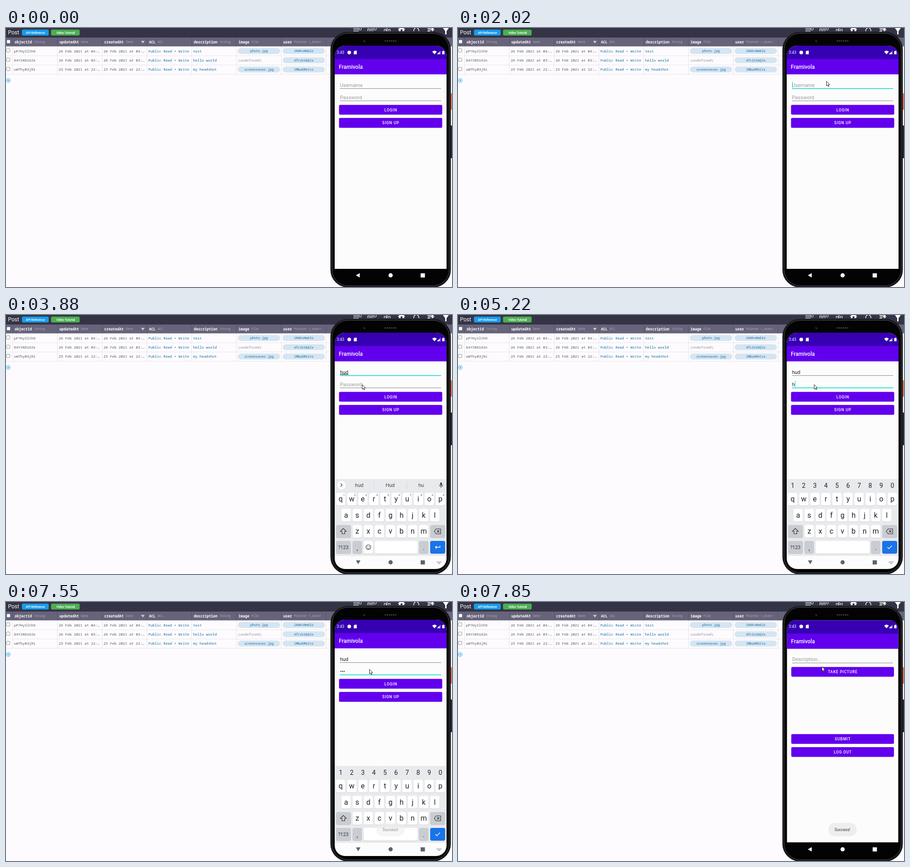
An HTML page for the animation above (8000 ms loop, 981 by 571 pixels).

```html
<!DOCTYPE html>
<html lang="en">
<head>
<meta charset="utf-8">
<title>Post table and phone app</title>
<style>
  html, body { margin: 0; width: 100%; height: 100%; overflow: hidden; background: #fdfbfd; }
  svg { display: block; width: 981px; height: 571px; font-family: Roboto, sans-serif; }
  text { white-space: pre; }
  .mono { font-family: "Noto Sans Mono", "DejaVu Sans Mono", monospace; }
</style>
</head>
<body>
<svg viewBox="0 0 981 571">
  <defs>
    <clipPath id="glass"><rect x="723" y="39" width="246" height="521" rx="23"/></clipPath>
  </defs>
  <g id="page"></g>
  <g id="phone"></g>
  <g id="screen" clip-path="url(#glass)"></g>
  <path id="pointer" d="M.5 .5V10.5L2.8 8.4L4.4 12L6 11.3L4.4 7.8H7.6Z" fill="#fff" stroke="#111" stroke-width=".9"/>
</svg>
<script>
const LOOP = 8000;
const PURPLE = '#6200ee', TEAL = '#03dac5', INK = '#202124', BLUE = '#0e69a1';
const APP_NAME = 'Framivola', USER = 'hud';
const $ = id => document.getElementById(id);

const rect = (x, y, w, h, fill, r = 0, extra = '') =>
  `<rect x="${x}" y="${y}" width="${w}" height="${h}" rx="${r}" fill="${fill}" ${extra}/>`;
const circle = (x, y, r, fill, extra = '') => `<circle cx="${x}" cy="${y}" r="${r}" fill="${fill}" ${extra}/>`;
const shape = (d, fill, extra = '') => `<path d="${d}" fill="${fill}" ${extra}/>`;
const line = (d, color, width = 1) => `<path d="${d}" fill="none" stroke="${color}" stroke-width="${width}"/>`;
const label = (s, x, y, size, fill, extra = '') =>
  `<text x="${x}" y="${y}" font-size="${size}" fill="${fill}" ${extra}>${s.replace(/</g, '&lt;')}</text>`;
const centered = (s, x, y, size, fill, extra = '') => label(s, x, y, size, fill, `text-anchor="middle" ${extra}`);
const mono = (s, x, y, size, fill, extra = '') => label(s, x, y, size, fill, `class="mono" ${extra}`);

// ---------- database table ----------
function toolbarIcons() {
  return line('M764 1H776M764 4H776M764 7H776M796 7V2H800V7M803 7V2H807V7M832 7V3H836V7M838 7V0M841 7V3H845V7', '#fff', 1.2)
    + circle(779, 2, 2.6, 'none', 'stroke="#fff"') + circle(812, 2, 2.6, 'none', 'stroke="#fff"')
    + shape('M862 3L870 -3L878 3L876 4V7H872V3H868V7H864V4Z', '#fff')
    + line('M897 7A6 6 0 0 1 901 0M904 0A6 6 0 0 1 908 7', '#fff', 1.5)
    + line('M927 1H936M928 4H934M927 7H933', '#fff', 1.3)
    + shape('M938 -1L934 5H938L936 9L943 3H939L942 -1Z', '#fff')
    + shape('M961 0H974L969 7V14H966V7Z', '#fff');
}

function buildPage() {
  const columns = [['objectId', 'String', 62], ['updatedAt', 'Date', 165], ['createdAt', 'Date', 264],
    ['ACL', 'ACL', 334], ['description', 'String', 470], ['image', 'File', 540], ['user', 'Pointer <_User>', 634]];
  const rows = [
    ['pP7HySlth9', '26 Feb 2021 at 04:…', 'test', 'photo.jpg', 'iN4KvNm62z'],
    ['84YSRDi6Ze', '26 Feb 2021 at 03:…', 'hello world', '', '4fc3rSAQIx'],
    ['uWThy03jRi', '25 Feb 2021 at 22:…', 'my headshot', 'screensaver.jpg', '1MbuKMrCvs']];
  const edges = [14.5, 113, 211.5, 310, 408.5, 507, 605.5, 704];
  const pill = (s, x, y) => rect(x, y - 6.5, 93, 13, '#d5e5f2', 6.5)
    + centered(s, x + 46.5, y + 2.6, 7.2, BLUE, 'class="mono"');

  let out = rect(0, 0, 981, 571, '#fdfbfd') + rect(0, 0, 981, 21, '#353446') + rect(0, 21, 981, 19.5, '#66637a')
    + label('Post', 4.5, 14, 12, '#fff')
    + rect(35, 3.5, 59, 13, '#169cee', 3) + rect(99, 3.5, 63, 13, '#4caf50', 3)
    + centered('API Reference', 64.5, 12.7, 7, '#fff', 'font-weight="500" letter-spacing="-.2"')
    + centered('Video Tutorial', 131, 12.7, 7, '#fff', 'font-weight="500" letter-spacing="-.2"')
    + toolbarIcons() + rect(2, 26.5, 7, 7, '#fff', 1) + shape('M297 28.5H305L301 34Z', '#cfcdd8');
  columns.forEach(([name, type, typeX], i) => {
    out += mono(name, edges[i] + 4.5, 33.5, 7.9, '#fff', 'font-weight="600"') + mono(type, typeX, 33.2, 6.6, '#b3b0c2');
  });
  edges.forEach(x => {
    out += rect(x - .5, 21, 1, 19.5, '#55526a') + rect(x - .5, 40.5, 1, 61, '#e5e4ea');
  });
  rows.forEach(([id, date, description, file, user], i) => {
    const y = 50.7 + i * 20.4, base = y + 2.9;
    out += rect(0, y + 10, 714, 1, '#e5e4ea') + rect(1, y - 5, 7.5, 7.5, '#fff', 1.5, 'stroke="#777" stroke-width=".8"')
      + mono(id, 17.5, base, 7.9, '#555566') + mono(date, 116, base, 7.9, '#555566') + mono(date, 214.5, base, 7.9, '#555566')
      + mono('Public Read + Write', 313, base, 7.9, BLUE) + mono(description, 411.5, base, 7.9, BLUE)
      + (file ? pill(file, 510, y) : mono('(undefined)', 510.5, base, 7.9, '#8a8a98'))
      + pill(user, 608.5, y);
  });
  return out + circle(5, 115.7, 4.2, 'none', 'stroke="#169cee"') + line('M2.7 115.7H7.3M5 113.4V118', '#169cee');
}

function buildPhone() {
  return rect(977, 144, 4, 36, '#e8795a') + rect(977, 215, 4, 72, '#26262a')
    + rect(714.5, 9.5, 263, 561.5, '#050506', 38, 'stroke="#1b1b1d" stroke-width="2"')
    + rect(717, 11.5, 258, 557, '#050506', 36, 'stroke="#58585c" stroke-width="1"')
    + rect(720, 14, 252, 552, '#030303', 33)
    + circle(788, 29, 2.2, '#242428') + line('M785 26L791 32', '#333', .8)
    + `<path d="M833 28.5H860" stroke="#3a3a3c" stroke-width="3" stroke-dasharray="3 1.5"/>`;
}

// ---------- phone screens ----------
function appBars() {
  return rect(723, 39, 246, 492, '#fdfcfd') + rect(723, 39, 246, 30, '#3700b3') + rect(723, 68.5, 246, 33.7, PURPLE)
    + label(APP_NAME, 732, 90.2, 12, '#fff', 'font-weight="500"');
}

function statusIcons() {
  return label('3:43', 727.5, 57.2, 8.6, '#fff') + circle(755, 54, 4, '#fff')
    + shape('M767 50H771.5V58H765V52Z', '#fff')
    + shape('M937.5 52.2Q942.5 48 947.5 52.2L942.5 58Z', '#fff')
    + shape('M948 58L956 50V58Z', '#fff', 'fill-opacity=".5"') + shape('M948 58L953.5 52.5V58Z', '#fff')
    + shape('M959.5 51H961V50H963V51H964.5V58H959.5Z', '#fff');
}

const button = (s, y, ripple = 0) => rect(732.5, y, 227, 21.6, PURPLE, 2.5)
  + (ripple ? rect(732.5, y, 227, 21.6, '#fff', 2.5, `opacity="${ripple}"`) : '')
  + centered(s, 846.4, y + 14, 8.5, '#fff', 'font-weight="500" letter-spacing=".76"');

function field(hint, value, base, { focused, caretX, underline }) {
  return label(value || hint, 734.7, base, 11, value ? '#222' : '#9b9a9b', underline ? 'text-decoration="underline"' : '')
    + (focused ? rect(734.5, base + 3.2, 222.5, 1.6, TEAL) : rect(734.5, base + 3.5, 222.5, 1, '#858485'))
    + (caretX ? rect(caretX, base - 11, 1.1, 13, TEAL) : '');
}

function loginScreen(t) {
  const name = USER.slice(0, [2880, 3030, 3180].filter(s => t >= s).length);
  const typed = [5220, 5370, 5970].filter(s => t >= s).length;
  const hidden = t >= 7400 ? typed : Math.max(0, typed - 1);
  const password = '•'.repeat(hidden) + USER.slice(hidden, typed);
  const onPassword = t >= 4010, onName = t >= 1860 && !onPassword;
  const nameCaret = onName && (t < 2590 || (t >= 2880 && t < 3640));
  const passwordCaret = onPassword && (t < 4760 || (t >= 5220 && t < 7400));
  const ripple = t >= 6510 && t < 6960 ? [.24, .17, .08][Math.floor((t - 6510) / 150)] : 0;
  return appBars()
    + field('Username', name, 129.5, { focused: onName, caretX: nameCaret && 735 + name.length * 6.1, underline: onName && name })
    + field('Password', password, 156.6, {
        focused: onPassword, caretX: passwordCaret && 735 + hidden * 3.5 + (typed - hidden) * 6.1 })
    + button('LOGIN', 169.5, ripple) + button('SIGN UP', 198.3);
}

const postScreen = () => appBars() + field('Description...', '', 129.5, {})
  + button('TAKE PICTURE', 142.4) + button('SUBMIT', 291.2) + button('LOG OUT', 320);

const toast = opacity => `<g opacity="${opacity}">` + rect(814.5, 487, 62.5, 29.5, '#eeeeee', 14.7)
  + centered('Success!', 845.6, 505.2, 8.6, '#333') + '</g>';

// ---------- keyboard ----------
const KEY_STEP = 24.37, GREY = '#c9ccd1';
const key = (x, y, w, fill = '#fff') => rect(x, y + .8, w, 28, '#c3c5c9', 4) + rect(x, y, w, 28, fill, 4);

function toolStrip() {
  return line('M739.5 371.5L736 375L739.5 378.5', '#444', 1.3)
    + circle(769.5, 374, 3.2, 'none', 'stroke="#555" stroke-width="1.3"') + line('M772 376.5L775.5 380', '#555', 1.4)
    + rect(801.5, 370.5, 9, 9, 'none', 2, 'stroke="#555" stroke-width="1.2"') + line('M803.5 375.5Q806 378.5 808.5 375.5M804 373H805M807.5 373H808.5', '#555')
    + centered('GIF', 841, 378, 8, '#444', 'font-weight="700"')
    + rect(873.5, 371, 8.5, 9.5, 'none', 1, 'stroke="#555" stroke-width="1.2"') + rect(876, 369.5, 3.5, 2.5, '#555')
    + line('M875.5 374.5H880M875.5 377H880', '#555', .9) + rect(899, 368, 1, 14, '#cfd1d5')
    + [917.5, 921.5, 925.5].map(x => circle(x, 375.3, 1.1, '#555')).join('');
}

function suggestionStrip(word) {
  const words = [word, word[0].toUpperCase() + word.slice(1), USER.slice(0, 2)];
  return line('M736 371.5L739.5 375L736 378.5', '#444', 1.3)
    + words.map((w, i) => centered(w, [777, 845, 913][i], 379.2, 11, '#444')).join('')
    + rect(809, 368, 1, 15, '#cfd1d5') + rect(881, 368, 1, 15, '#cfd1d5');
}

function keyboard(t) {
  const numeric = t >= 4150;
  const word = USER.slice(0, t < 3030 ? 1 : t < 3180 ? 2 : 3);
  let out = rect(723, 361.5, 246, 170, '#e8eaed');
  if (!numeric) {
    out += circle(738, 375, 9.2, '#fff') + (t < 2880 ? toolStrip() : suggestionStrip(word))
      + rect(955, 369, 4, 7.5, '#444', 2) + line('M953 374A4 4 0 0 0 961 374M957 378V381', '#444', 1.1);
  }
  [['qwertyuiop', 736.1, 392], ['asdfghjkl', 748.2, 427.5], ['zxcvbnm', 772.6, 463]].forEach(([letters, x0, y]) => {
    [...letters].forEach((c, i) => {
      const x = x0 + i * KEY_STEP;
      out += key(x - 10.3, y, 20.6) + centered(c, x, y + 19, 16, INK);
    });
  });
  [...'1234567890'].forEach((digit, i) => {
    const x = 736.1 + i * KEY_STEP;
    out += numeric ? centered(digit, x, 381, 14, INK) : centered(digit, x + 7, 399, 6, '#444');
  });
  out += key(726, 463, 32.5, GREY) + line('M742 470.5L735.5 477H739V482.5H745V477H748.5Z', '#333', 1.2)
    + key(933, 463, 33, GREY) + line('M942 477L946 471.5H956V482.5H946ZM948 474.5L953 479.5M953 474.5L948 479.5', '#333', 1.2)
    + key(726, 498, 32.5, GREY) + centered('?123', 742, 516, 10.5, '#333')
    + key(762.3, 498, 20.6, GREY) + centered(',', 772.6, 519, 14, INK)
    + key(908.5, 498, 20.6, GREY) + centered('.', 918.8, 518, 14, INK)
    + key(numeric ? 786.5 : 811, 498, numeric ? 118.5 : 94) + key(933, 498, 33, '#1a73e8');
  if (!numeric) {
    out += key(786.7, 498, 20.6) + circle(797, 511.8, 5.3, 'none', 'stroke="#333" stroke-width="1.1"')
      + circle(795, 510.3, .9, '#333') + circle(799, 510.3, .9, '#333') + line('M794 513Q797 517 800 513', '#333');
  }
  return out + line(numeric ? 'M944.5 512L947.8 515.3L954.5 508.5' : 'M954.5 508.5V512H944.5M947.5 509L944.5 512L947.5 515', '#fff', 1.4);
}

function navBar(t, open) {
  const ink = open ? '#5f6368' : '#fff';
  const back = open && t >= 2440 ? 'M769.8 541H779.6L774.7 549.5Z' : 'M778 540.5V550L769.5 545.2Z';
  let out = rect(723, 531, 246, 30, open ? '#fdfcfd' : '#030303')
    + shape(back, ink) + circle(846, 545.2, 4.6, ink) + rect(912, 540.8, 9.4, 9.2, ink);
  if (open) {
    out += `<path d="M947.5 543.5H957.5M947.5 545.5H957.5" stroke="${ink}" stroke-width="1.1" stroke-dasharray="1.2 1"/>`
      + line('M950 547.7H955', ink);
  }
  return out;
}

function buildScreen(t) {
  const posted = t >= 7700, open = t >= 2140 && !posted;
  let out = rect(723, 39, 246, 521, '#030303');
  if (posted) {
    const scale = t >= 7850 ? .995 : .97;
    out += `<g transform="translate(846 300) scale(${scale}) translate(-846 -300)">${postScreen()}</g>`;
  } else {
    out += loginScreen(t);
  }
  if (open) out += `<g transform="translate(0 ${t < 2290 ? 60 : 0})">${keyboard(t)}</g>`;
  out += navBar(t, open) + statusIcons();
  if (t >= 7550) out += toast(posted ? 1 : .55);
  return out;
}

// ---------- timeline: pointer holds each position until the next time ----------
const pointerStops = [
  [150, 748, 524], [300, 797, 512], [440, 830, 435], [580, 868, 300], [720, 868, 248], [860, 867, 215],
  [1000, 866, 190], [1140, 866, 175], [1290, 818, 148], [1440, 813, 138], [1580, 810, 126], [1720, 810, 117],
  [3640, 804, 131], [3760, 790, 147], [3880, 783, 153], [6110, 786, 161], [6250, 792, 174], [6390, 797, 184],
  [6960, 799, 165], [7110, 799, 148], [7700, 800, 142]];
const changes = [0, 1860, 2140, 2290, 2440, 2590, 2880, 3030, 3180, 3640, 4010, 4150, 4760, 5220, 5370, 5970,
  6510, 6660, 6810, 6960, 7400, 7550, 7700, 7850];

$('page').innerHTML = buildPage();
$('phone').innerHTML = buildPhone();
let shown = -1;

function frame() {
  const t = performance.now() % LOOP;
  const state = changes.findLast(s => t >= s);
  if (state !== shown) $('screen').innerHTML = buildScreen(shown = state);
  const stop = pointerStops.findLast(([s]) => t >= s);
  $('pointer').setAttribute('visibility', stop ? 'visible' : 'hidden');
  if (stop) $('pointer').setAttribute('transform', `translate(${stop[1]} ${stop[2]})`);
  requestAnimationFrame(frame);
}
frame();
</script>
</body>
</html>
```
